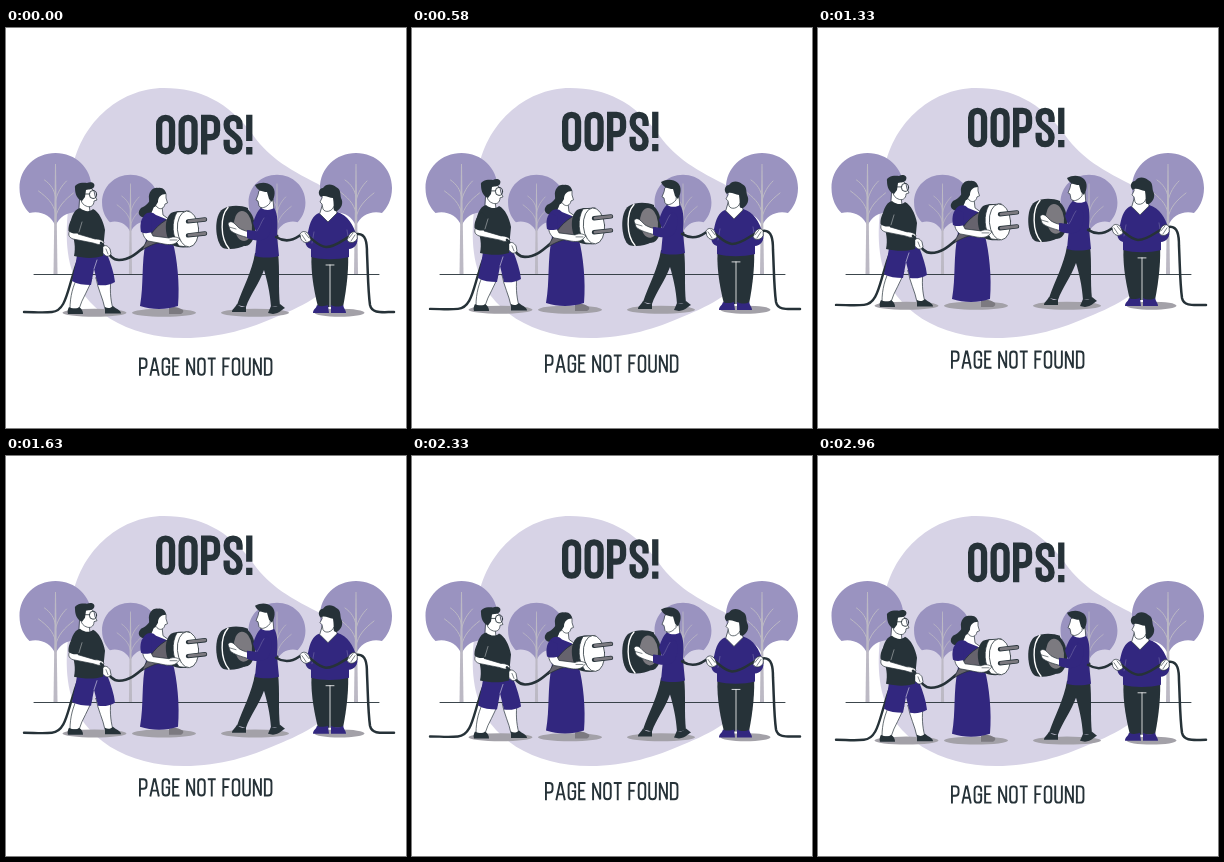
An HTML page with a canvas for the animation above (3000 ms loop, 400x400 px).

```html
<!DOCTYPE html>
<html lang="en">
<head>
<meta charset="utf-8">
<title>Page not found</title>
<style>
  html, body { margin: 0; width: 100%; height: 100%; overflow: hidden; background: #fff; }
  canvas { display: block; width: 400px; height: 400px; }
</style>
</head>
<body>
<canvas id="stage" role="img" aria-label="OOPS! PAGE NOT FOUND"></canvas>
<script>
const LOOP = 3000, LIFT = 8;
const DARK = '#263238', BLUE = '#32277f', WHITE = '#fff', CROWN = '#9a93c0',
      BLOB = '#d7d3e6', BARK = '#bcb9c4', GREY = '#7c7a80', SHADE = '#a3a1a8';

const canvas = document.getElementById('stage');
const ctx = canvas.getContext('2d');
const dpr = window.devicePixelRatio || 1;
canvas.width = canvas.height = 400 * dpr;

function fill(color, d) {
  ctx.fillStyle = color;
  ctx.fill(new Path2D(d));
}
function line(color, width, d) {
  ctx.strokeStyle = color;
  ctx.lineWidth = width;
  ctx.stroke(new Path2D(d));
}
function skin(d) {
  fill(WHITE, d);
  line(DARK, 0.7, d);
}
function oval(color, x, y, rx, ry, tilt = 0, edge) {
  ctx.beginPath();
  ctx.ellipse(x, y, rx, ry, tilt, 0, Math.PI * 2);
  if (color) { ctx.fillStyle = color; ctx.fill(); }
  if (edge) { ctx.strokeStyle = DARK; ctx.lineWidth = edge; ctx.stroke(); }
}

// Condensed capitals as strokes in a unit box
const BOWL = 'C.8 0 1 .07 1 .2';
const GLYPHS = {
  O: 'M0 .2C0 .07 .2 0 .5 0S1 .07 1 .2V.8C1 .93 .8 1 .5 1S0 .93 0 .8Z',
  P: `M0 1V0H.5${BOWL}V.38C1 .51 .8 .58 .5 .58H0`,
  S: 'M1 .24V.2C1 .07 .8 0 .5 0S0 .07 0 .2C0 .36 .18 .4 .5 .5S1 .66 1 .8C1 .93 .8 1 .5 1S0 .93 0 .8V.75',
  A: 'M0 1L.43 0H.57L1 1M.2 .7H.8',
  G: 'M1 .27V.2C1 .07 .8 0 .5 0S0 .07 0 .2V.8C0 .93 .2 1 .5 1S1 .93 1 .8V.5H.62',
  E: 'M1 0H0V1H1M0 .48H.8',
  F: 'M1 0H0V1M0 .48H.8',
  N: 'M0 1V0L1 1V0',
  T: 'M0 0H1M.5 0V1',
  U: 'M0 0V.8C0 .93 .2 1 .5 1S1 .93 1 .8V0',
  D: `M0 0H.5${BOWL}V.8C1 .93 .8 1 .5 1H0Z`,
  '!': 'M.5 0V.6M.5 .97V1',
  ' ': ''
};
const WIDTHS = { A: 1.18, E: 0.86, F: 0.86, N: 1.06, T: 0.94, '!': 0.34, ' ': 0.3 };

function letters(text, x, top, cap, wide, weight, gap) {
  const path = new Path2D();
  for (const ch of text) {
    const w = wide * (WIDTHS[ch] || 1);
    path.addPath(new Path2D(GLYPHS[ch]),
      new DOMMatrix([w - weight, 0, 0, cap - weight, x + weight / 2, top + weight / 2]));
    x += w + gap;
  }
  ctx.save();
  ctx.lineCap = 'square';
  ctx.lineJoin = 'miter';
  ctx.miterLimit = 2;
  ctx.strokeStyle = DARK;
  ctx.lineWidth = weight;
  ctx.stroke(path);
  ctx.restore();
}

function tree(x, y, k) {
  ctx.save();
  ctx.translate(x, y);
  ctx.scale(k, k);
  fill(CROWN, 'M0 -35C20 -35 36 -20 36 0C36 12 31 20 26 25C16 22 4 27 0 38C-4 27 -16 22 -26 25C-31 20 -36 12 -36 0C-36 -20 -20 -35 0 -35Z');
  line(BARK, 1, 'M0 25C-2 15 -9 9 -17 3M0 9C-1 2 -5 -4 -11 -8M0 30C2 19 9 12 18 5M0 13C2 4 6 -2 11 -7');
  fill(BARK, `M-.5 -24H.5L2 ${(246 - y) / k}H-2Z`);
  ctx.restore();
}

function backdrop() {
  fill(BLOB, 'M158 60C112 60 72 98 66 145C63 178 57 205 64 236C75 283 122 310 178 310C215 310 245 300 270 289C300 277 328 262 336 238C344 205 338 172 312 156C280 140 260 127 245 104C222 75 195 60 158 60Z');
  tree(124.5, 174.5, 0.79);
  tree(271, 174.5, 0.79);
  tree(49.5, 160, 1);
  tree(350, 160, 1);
  line(DARK, 0.9, 'M28 246.5H373');
}

function shadows() {
  for (const [x, r] of [[88.5, 32], [158, 32], [249, 34], [333.5, 25]]) oval(SHADE, x, 284.8, r, 4);
}

function walker() {
  line(DARK, 2.4, 'M18 284C28 284 36 285 46 284C59 283 61 265 67 247C72 229 78 216 92 214');
  skin('M72 248L86 250C83 262 76 270 73 281H64C64 268 67 258 72 248Z');
  skin('M90 250L105 250C104 261 104 270 107 281H99C97 270 92 262 90 250Z');
  fill(DARK, 'M63 279C67 281 71 281 73 279C76 281 77 283 77 286H62C61 283 62 281 63 279Z');
  fill(DARK, 'M99 279C102 281 105 280 107 278C110 281 115 282 115 285.5H99Z');
  fill(BLUE, 'M71 227L101 226C105 236 108 245 109 254C104 257 98 258 92 257L88 241L85 257C78 257 71 256 66 253C68 243 70 235 71 227Z');
  line(WHITE, 0.5, 'M88 241L91 232');
  skin('M74 170L83 174L84 185C80 188 76 187 73 183Z');
  fill(DARK, 'M74 180C79 184 84 184 87 181C93 184 97 192 99 202L98 212L97 228C87 231 77 230 68 228C70 219 68 211 66 205L63 202C65 190 67 182 74 180Z');
  skin('M76 162C80 158 86 160 88 163L89 168L91 172L88 173C88 178 84 180 80 178C75 176 73 170 76 162Z');
  fill(DARK, 'M69 160C68 156 75 154 81 155C85 153 90 155 88 159C86 162 83 161 80 162L79 169L76 173C71 171 69 166 69 160Z');
  oval(null, 87, 166.5, 3.6, 4, 0, 0.9);
  line(DARK, 0.8, 'M83.5 166H78');
  skin('M64 202L72 204L72 206L89 211C94 211 98 213 98 215C94 218 91 216 87 215L67 211C62 209 62 206 64 202Z');
  fill(DARK, 'M69 187C64 192 62 198 62.5 203C66 206 70 206 73 205L76 193Z');
  line(WHITE, 0.4, 'M76 194L73 204');
}

function leftCord() {
  line(DARK, 2.6, 'M95 215C101 220 103 232 113 232C123 232 130 226 138 219');
  skin('M97 219C99 216 102 218 104 221L105 226C102 230 99 228 97 225Z');
  line(DARK, 0.6, 'M100 221L102 226');
}

function holder() {
  fill(GREY, 'M163 280C168 278 172 279 177 282C178 284 176 286 174 286H163Z');
  fill(BLUE, 'M140 212C149 211 160 212 167 215C171 230 174 256 172 278C160 282 146 282 134 278C138 256 135 236 140 212Z');
  fill(DARK, 'M146 168C143 176 139 178 135 180C130 185 134 191 141 189C149 188 152 182 152 174Z');
  skin('M149 176L156 178L157 187L164 192L149 194L144 188Z');
  fill(BLUE, 'M141 185C144 184 147 184 150 187L160 191L164 198L162 216L140 217C141 209 136 204 136 198C136 192 137 187 141 185Z');
  skin('M150 165C153 161 159 162 160 166L160 170L161.5 175L159 176C158 181 154 182 151 179C147 175 147 169 150 165Z');
  fill(DARK, 'M143 171C142 164 147 159 152 160C157 159 160 163 160 166C155 166 152 169 152 174L149 179C145 179 143 175 143 171Z');
}

function plug() {
  fill('#66636d', 'M136 222C143 207 151 196 164 190L168 213C157 213 147 215 136 222Z');
  line(DARK, 0.8, 'M136 222C143 207 151 196 164 190M168 213C157 213 147 215 136 222');
  fill(DARK, 'M165 185C172 182 181 183 184 185L182 219C176 220 170 219 166 217C159 210 157 192 165 185Z');
  fill(WHITE, 'M171 184L183 183L182 219L173 218C166 209 165 194 171 184Z');
  line(DARK, 0.8, 'M171 184C165 194 166 209 173 218M171 184L183 183M173 218L182 219');
  oval(WHITE, 182, 201, 10.6, 18, -0.08, 0.8);
  for (const y of [193, 207]) {
    line(DARK, 4.4, `M182 ${y + 0.4}L199 ${y - 1.5}`);
    line(GREY, 2.8, `M183 ${y + 0.2}L199 ${y - 1.5}`);
  }
}

function holderArm() {
  skin('M137 201L144 202L147 208L163 210C168 208 171 209 174 211L170 215C165 218 158 216 153 215L142 213C138 210 136 206 137 201Z');
  line(DARK, 0.6, 'M164 212L171 212');
  fill(BLUE, 'M138 188C134 192 134 199 135 204C139 206 143 205 146 204L145 191Z');
}

function socket() {
  fill(DARK, 'M217 181C224 177 234 177 242 180L240 217C233 221 223 222 217 220C209 215 207 187 217 181Z');
  line(WHITE, 1.4, 'M222 179.5C214 188 214 210 223 220.5');
  oval(DARK, 237.5, 198.5, 11.5, 19.5, -0.1);
  oval(GREY, 237, 198, 9, 15, -0.1);
  line(DARK, 3, 'M243 204C252 211 262 208 271 208');
}

function strider() {
  fill(DARK, 'M249 225L272 225C274 243 272 260 274 278L265 279C264 264 261 252 258 242C253 256 244 267 240 279L231 277C237 259 246 244 249 225Z');
  fill(DARK, 'M231 276C234 279 237 280 240 278L240 284H226C226 281 229 280 231 276Z');
  fill(DARK, 'M265 278C268 280 271 279 274 276L279 280C275 282 274 285 267 286L262 285Z');
  skin('M256 173L267 171L268 184C263 186 258 186 255 183Z');
  fill(BLUE, 'M255 180C260 183 265 182 268 180C272 185 272 197 271 208L273 228C265 230 256 230 249 228L251 207L247 195C249 189 251 183 255 180Z');
  skin('M253 163C256 160 263 161 265 165L264 175C260 180 255 181 253 178L252 173L250 172L252 167Z');
  fill(DARK, 'M249 157C255 154 261 154 266 158C270 162 269 169 266 174L263 171L261 164C256 164 251 162 249 157Z');
  skin('M252 204C245 205 238 203 233 200L229 196C226 193 223 193 222 196L224 202C228 206 236 208 243 210L252 211Z');
  line(DARK, 0.6, 'M223 199L230 201');
  fill(BLUE, 'M260 187C267 188 267 198 263 207C260 213 250 214 241 210L241 202L251 203Z');
  line('#827daf', 0.5, 'M258 190C255 194 254 199 251 203');
}

function keeper() {
  fill(DARK, 'M306 220H342C343 239 341 259 337 279H312C307 259 304 239 306 220Z');
  line(WHITE, 0.8, 'M320 237H328M324 237V279');
  fill(BLUE, 'M311 277C315 279 319 278 322 277L323 285H307C307 281 310 281 311 277Z');
  fill(BLUE, 'M325 277C329 279 334 279 337 277C338 281 340 282 340 285H325Z');
  fill(BLUE, 'M313 185C317 190 326 191 331 184C342 187 347 197 351 208C353 216 348 221 343 221V229C331 232 316 232 305 229V221C298 219 298 211 302 204C304 194 307 187 313 185Z');
  skin('M317 176L329 176L331 185L322 194L314 186Z');
  line('#827daf', 0.5, 'M308 204L306 215M341 202L343 214');
  skin('M316 166C320 161 327 163 329 169L328 178C326 184 319 185 317 181L316 176L314 174L316 170Z');
  fill(DARK, 'M315 169C311 166 313 160 317 160C320 155 327 156 330 159C335 161 334 166 335 170C338 175 335 181 331 183C328 184 327 181 328 178L327 170C323 170 318 166 315 169Z');
}

function rightCord() {
  line(DARK, 2.5, 'M270 209C278 214 286 213 293 208C304 203 308 218 320 219C333 219 340 207 351 206C360 205 361 215 361 225C362 246 362 263 364 277C366 286 376 284 388 284');
  skin('M294 206C296 202 301 203 303 207L305 212C301 216 297 215 295 211Z');
  skin('M351 206C349 202 345 204 343 207L341 212C344 216 349 215 351 211Z');
  line(DARK, 0.6, 'M296 207L300 213M299 205L303 210M349 207L345 213M347 205L343 210');
}

function people() {
  walker();
  holder();
  leftCord();
  plug();
  holderArm();
  socket();
  strider();
  keeper();
  rightCord();
}

function draw() {
  const t = performance.now() % LOOP;
  const rise = LIFT * (1 - Math.abs(1 - 2 * t / LOOP));
  ctx.setTransform(dpr, 0, 0, dpr, 0, 0);
  ctx.fillStyle = WHITE;
  ctx.fillRect(0, 0, 400, 400);
  ctx.lineCap = ctx.lineJoin = 'round';
  backdrop();
  ctx.translate(0, -rise);
  shadows();
  letters('OOPS!', 150, 86.8, 39.6, 19.2, 6.3, 3.3);
  people();
  letters('PAGE NOT FOUND', 133, 329.6, 18.2, 8.5, 1.9, 2.05);
  requestAnimationFrame(draw);
}
draw();
</script>
</body>
</html>
```
